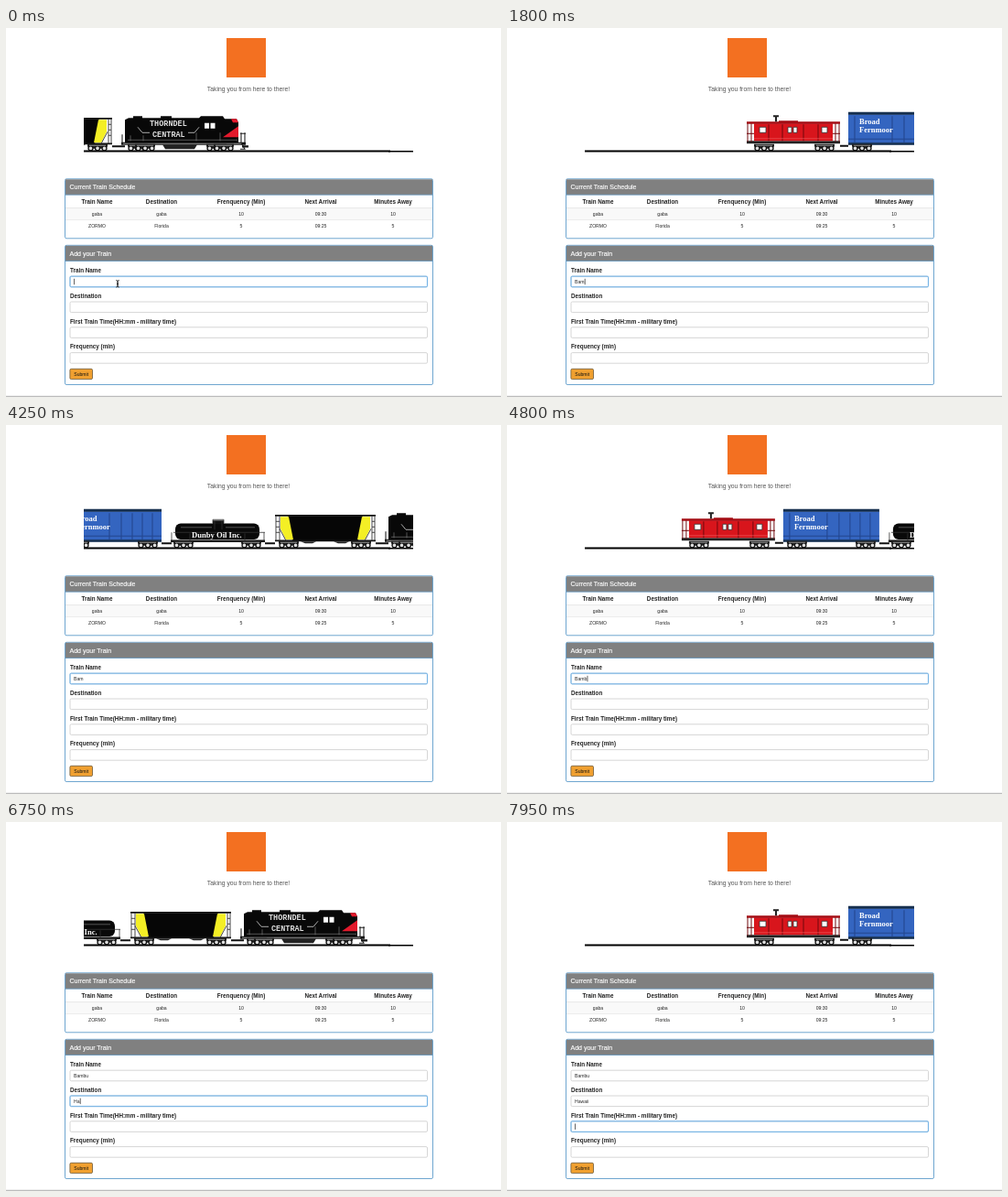
Animation of 541 by 403 pixels, one loop 8 s. Source, as an HTML page:

```html
<!DOCTYPE html>
<html lang="en">
<head>
<meta charset="utf-8">
<title>Train schedule</title>
<style>
  html, body { margin: 0; width: 100%; height: 100%; overflow: hidden; background: #fff; }
  svg { display: block; width: 541px; height: 403px; font-family: "Liberation Sans", Arial, sans-serif; }
  .head { font-size: 7px; fill: #fff; stroke: #fff; stroke-width: .15px; }
  .bold { font-size: 6.3px; font-weight: 700; fill: #222; }
  .cell { font-size: 5.1px; fill: #222; }
  .mid { text-anchor: middle; }
  .mono { font: 700 8.5px "Liberation Mono", monospace; fill: #ddd; }
  .serif { font-family: "Liberation Serif", serif; font-weight: 700; fill: #fff; }
</style>
</head>
<body>
<svg viewBox="0 0 541 403" xmlns="http://www.w3.org/2000/svg">
  <defs>
    <clipPath id="view"><rect x="85" y="86" width="360" height="50"/></clipPath>
    <g id="truck">
      <path d="M-11 125.500h22v3h-4l-2 2h-10l-2-2h-4z" fill="#222"/>
      <g fill="#ddd" stroke="#111" stroke-width="1.300">
        <circle cx="-7.500" cy="130" r="2.500"/><circle cx="0" cy="130" r="2.500"/><circle cx="7.500" cy="130" r="2.500"/>
      </g>
      <path d="M-9 127h18" stroke="#bbb" stroke-width=".7"/>
    </g>
  </defs>
  <rect width="541" height="403" fill="#fff"/>
  <rect x="241" y="11" width="43" height="43" fill="#f37021"/>
  <text class="mid" x="265" y="69" font-size="6.800" fill="#555">Taking you from here to there!</text>

  <g clip-path="url(#view)" transform="translate(0 1.300)">
    <path d="M85 133.200H420" stroke="#000" stroke-width="2.200"/>
    <path d="M418 133.400H445" stroke="#000" stroke-width="1.500"/>
    <g id="train">
      <!-- caboose -->
      <path d="M-334 122h102v3h-102z" fill="#222"/>
      <path d="M-326 103h86v19h-86z" fill="#d8151c"/>
      <path d="M-334 101h102v2.500h-102zM-299 100h21v3h-21z" fill="#a40d14"/>
      <path d="M-303 101v-5h-2v-2h6v2h-2v5z" fill="#222"/>
      <path d="M-333 103v20M-329 103v20M-237 103v20M-233 103v20M-334 114h8M-240 114h8M-310 104v18M-295 104v18M-272 104v18M-256 104v18" stroke="#70080c" fill="none"/>
      <path d="M-320 107h7v6h-7zM-289 107h4v6h-4zM-283 107h4v6h-4zM-252 107h6v6h-6z" fill="#fff" stroke="#333" stroke-width=".8"/>
      <path d="M-326 119.500h86" stroke="#f2575b" stroke-width=".7"/>
      <use href="#truck" x="-315"/><use href="#truck" x="-249"/>
      <path d="M-232 127.500h9" stroke="#111" stroke-width="2"/>
      <!-- box car -->
      <path d="M-223 93h105v33h-105z" fill="#3465c0"/>
      <path d="M-223 90.500h105v3h-105zM-223 124h105v2.500h-105z" fill="#17304f"/>
      <path d="M-216 95v29M-175 95v29M-162 95v29M-150 95v29M-139 95v29M-128 95v29M-223 120h105" stroke="#23468f" stroke-width="1.100"/>
      <text class="serif" x="-211" y="103.500" font-size="8.500">Broad</text>
      <text class="serif" x="-211" y="113" font-size="8.500">Fernmoor</text>
      <use href="#truck" x="-208"/><use href="#truck" x="-133"/>
      <path d="M-118 128h11" stroke="#111" stroke-width="2"/>
      <!-- tank car -->
      <path d="M-108 124.300h103v2.500h-103z" fill="#111"/>
      <rect x="-103" y="106.200" width="92" height="17.500" rx="6" fill="#090909"/>
      <path d="M-62 107v-4h12v4z" fill="#111"/>
      <path d="M-62 106v-4h12v4M-105 116h100M-107 116v9M-6 116v9M-87 117v8M-27 117v8M-60 104v9M-52 104v9" stroke="#333" stroke-width=".8" fill="none"/>
      <path d="M-97 110.500h34M-48 110.500h32" stroke="#666" stroke-width=".8"/>
      <text class="serif" x="-85" y="121.700" font-size="8.600">Dunby Oil Inc.</text>
      <use href="#truck" x="-94"/><use href="#truck" x="-20"/>
      <path d="M-5 128h11" stroke="#111" stroke-width="2"/>
      <!-- hopper -->
      <path d="M20 98h82l-5 27h-72z" fill="#060606"/>
      <path d="M12 99h9l5 25h-8l-6-12zM110 99h-9l-5 25h8l6-12z" fill="#f4ef25"/>
      <path d="M6 97.500h110M6 125h110" stroke="#111" stroke-width="1.800"/>
      <path d="M7 98v27M11 98v27M112 98v27M115 98v27M11 112l7 13M111 112l-7 13M7 104h4M7 110h4M7 116h4M112 104h3M112 110h3M112 116h3" stroke="#333" stroke-width=".9"/>
      <path d="M34 126l5 2h8l4-2zM70 126l5 2h8l4-2z" fill="#222"/>
      <use href="#truck" x="21"/><use href="#truck" x="100"/>
      <path d="M116 128h14" stroke="#111" stroke-width="2"/>
      <!-- engine -->
      <path d="M130 124V99l4-2h5v-2h10v2h20v-2h12v2h30l2-2h24l2 3h13l2 4v22z" fill="#080808"/>
      <path d="M254 106v12h-17zM246 98h6l2 4h-6z" fill="#e3192c"/>
      <path d="M217 102.500h5v6h-5zM223.500 102.500h5v6h-5z" fill="#fff"/>
      <path d="M144 107l5 6h8M199 113h7l5-6" stroke="#bbb" stroke-width=".9" fill="none"/>
      <path d="M133 121h120M136 116v6M150 116v6M208 113v9M234 113v9" stroke="#888" stroke-width=".6"/>
      <path d="M126 123.500h136v3h-136z" fill="#111"/>
      <path d="M128 125h130" stroke="#ddd" stroke-width=".6"/>
      <path d="M171 126h38l-3 5h-32z" fill="#222"/>
      <path d="M127 115v10M257 113v11l4 7h-5M261 113v11M256 114h6" stroke="#222" stroke-width="1.100" fill="none"/>
      <path d="M258 128h7" stroke="#111" stroke-width="2.200"/>
      <text class="mono" x="157" y="106.200">THORNDEL</text>
      <text class="mono" x="160" y="118.200">CENTRAL</text>
      <use href="#truck" x="144"/><use href="#truck" x="152"/><use href="#truck" x="230"/><use href="#truck" x="238"/>
    </g>
  </g>

  <g id="page"></g>
  <rect id="caret" width=".7" height="6.500" fill="#222"/>
  <path id="mouse" d="M120.300 275.500q1.700 0 1.700 1.200v5.200q0 1.200-1.700 1.200M123.700 275.500q-1.700 0-1.700 1.200v5.200q0 1.200 1.700 1.200M121 279.500h2" fill="none" stroke="#222" stroke-width=".9"/>
  <path d="M0 402.300H541" stroke="#aaa"/>
</svg>
<script>
const LOOP = 8000, CYCLE = 960, BLINK = 1060;
const $ = id => document.getElementById(id);
const page = $('page');

function add(tag, attrs, text) {
  const el = document.createElementNS('http://www.w3.org/2000/svg', tag);
  for (const k in attrs) el.setAttribute(k, attrs[k]);
  if (text) el.textContent = text;
  return page.appendChild(el);
}
const label = (cls, x, y, text) => add('text', { class: cls, x, y }, text);
const box = (x, y, width, height, fill, more) => add('rect', { x, y, width, height, fill, ...more });

function panel(y, h, title) {
  box(64.5, y, 402, h, '#fff', { rx: 1.6, stroke: '#5f9ccb', 'stroke-width': 0.9 });
  box(65, y + 0.5, 401, 17, '#808080');
  box(65, y + 17, 401, 0.7, '#5f9ccb');
  label('head', 69.5, y + 11.4, title);
}

panel(164.8, 65, 'Current Train Schedule');
box(65, 197, 401, 12.5, '#f9f9f9');
box(65, 196.4, 401, 0.7, '#ddd');
box(65, 209.3, 401, 0.5, '#ddd');
const columns = [99.5, 170, 257, 344, 423];
[
  ['Train Name', 'Destination', 'Frenquency (Min)', 'Next Arrival', 'Minutes Away'],
  ['gaba', 'gaba', '10', '09:30', '10'],
  ['ZORMO', 'Florida', '5', '09:25', '5']
].forEach((row, r) => row.forEach((text, c) =>
  label(r ? 'cell mid' : 'bold mid', columns[c], [192, 205.2, 218][r], text)));

panel(237.3, 152.2, 'Add your Train');
const fields = ['Train Name', 'Destination', 'First Train Time(HH:mm - military time)', 'Frequency (min)'].map((name, i) => {
  const y = 271.2 + i * 27.8;
  const frame = { rx: 1.4, stroke: '#66afe9', 'stroke-width': 0.8 };
  label('bold', 70, y - 4.2, name);
  box(70, y, 390.5, 11.6, '#fff', { rx: 1.4, stroke: '#ccc', 'stroke-width': 0.8 });
  const glow = [
    box(70, y, 390.5, 11.6, 'none', { ...frame, 'stroke-width': 2, 'stroke-opacity': 0.2 }),
    box(70, y, 390.5, 11.6, 'none', frame)
  ];
  return { y, glow, value: label('cell', 74, y + 7.6, '') };
});
box(69.9, 372.3, 24.6, 11.3, '#f0a030', { rx: 1.4, stroke: '#6b5a3c', 'stroke-width': 0.8 });
label('cell mid', 82.2, 379.8, 'Submit').style.fill = '#111';

// time, field, typed value
const keys = [
  [0, 0, ''], [900, 0, 'B'], [1200, 0, 'Ba'], [1550, 0, 'Bam'],
  [4600, 0, 'Bamb'], [4850, 0, 'Bambu'],
  [5250, 1, ''], [6300, 1, 'H'], [6600, 1, 'Ha'], [6900, 1, 'Haw'],
  [7100, 1, 'Hawa'], [7300, 1, 'Hawai'], [7500, 1, 'Hawaii'], [7750, 2, '']
];
const focusAt = [-1000, 5250, 7750];

// time, distance covered by the front of the engine
const run = [
  [0, 265], [1800, 861], [2550, 1046], [3250, 1225], [3400, 1305],
  [4250, 1513], [5550, 2073], [6750, 2315], [7950, 2781]
];
function nose(t) {
  const i = run.findIndex(p => p[0] > t);
  const [[t0, x0], [t1, x1]] = i < 0 ? run.slice(-2) : [run[i - 1], run[i]];
  const x = x0 + (x1 - x0) * (t - t0) / (t1 - t0);
  return 85 + (x - 85) % CYCLE;
}

function draw(ms) {
  const t = Math.floor((ms % LOOP) / 50) * 50;
  $('train').setAttribute('transform', `translate(${(nose(t) - 265).toFixed(1)})`);

  const past = keys.filter(k => k[0] <= t);
  const [typedAt, active] = past[past.length - 1];
  fields.forEach((f, i) => {
    const last = past.filter(k => k[1] === i).pop();
    f.value.textContent = last ? last[2] : '';
    const fade = at => Math.min(1, Math.max(0, (t - at + 50) / 150));
    const on = i > active ? 0 : fade(focusAt[i]) - (i < active ? fade(focusAt[i + 1]) : 0);
    f.glow.forEach(g => g.setAttribute('opacity', on));
  });

  const f = fields[active];
  const width = f.value.textContent ? f.value.getComputedTextLength() : 0;
  $('caret').setAttribute('x', 74.3 + width);
  $('caret').setAttribute('y', f.y + 2.6);
  $('caret').setAttribute('opacity', (t - typedAt) % BLINK < BLINK / 2 ? 1 : 0);
  $('mouse').setAttribute('opacity', t < 900 ? 1 : 0);
}

const start = performance.now();
function tick() {
  draw(performance.now() - start);
  requestAnimationFrame(tick);
}
tick();
</script>
</body>
</html>
```
